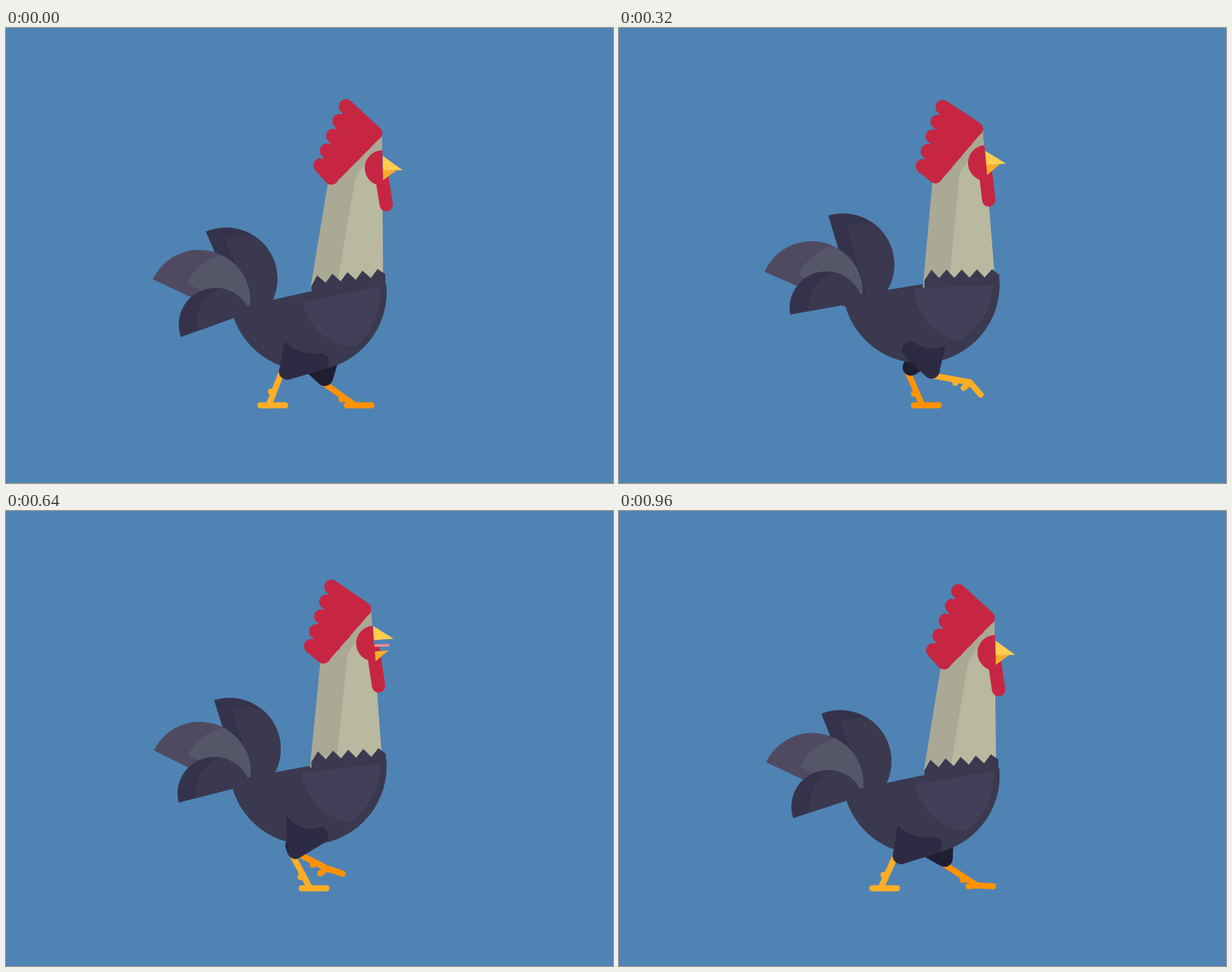
Animation, 800 px wide and 600 px high, one loop 1 s. Source, as an HTML page with a canvas:

```html
<!DOCTYPE html>
<html lang="en">
<head>
<meta charset="utf-8">
<title>Walking rooster</title>
<style>
html, body { margin: 0; height: 100%; overflow: hidden; background: #4f83b4; }
canvas { display: block; }
</style>
</head>
<body>
<canvas id="stage" width="800" height="600"></canvas>
<script>
const g = document.getElementById('stage').getContext('2d');
const LOOP = 1000, STEP = 40, PI = Math.PI, DEG = PI / 180;
const GROUND = 497.5, THIGH = 45, SHIN = 53;
const BODY = '#3b3950', TAIL = '#35334b', RED = '#c62641';

// Mean plus cosine and sine amplitudes of the first, second, ... harmonic
const wave = (w, mean, ...amps) => amps.reduce((sum, a, i) =>
  sum + a * Math[i % 2 ? 'sin' : 'cos']((1 + (i >> 1)) * w), mean);
const polar = (x, y, r, deg) => [x + r * Math.cos(deg * DEG), y + r * Math.sin(deg * DEG)];
const mix = (a, b, u) => [a[0] + (b[0] - a[0]) * u, a[1] + (b[1] - a[1]) * u];

function trace(pts, close) {
  g.beginPath();
  pts.forEach(p => g.lineTo(p[0], p[1]));
  if (close) g.closePath();
}
function fill(color) {
  g.fillStyle = color;
  g.fill();
}
function poly(color, pts) {
  trace(pts, true);
  fill(color);
}
function line(color, width, pts, close) {
  trace(pts, close);
  g.strokeStyle = color;
  g.lineWidth = width;
  g.stroke();
}
function dot(color, x, y, r) {
  g.beginPath();
  g.arc(x, y, r, 0, 2 * PI);
  fill(color);
}
function place(x, y, deg, draw) {
  g.save();
  g.translate(x, y);
  g.rotate(deg * DEG);
  draw();
  g.restore();
}

// Half disc with a shifted half disc inside it
function feather(x, y, deg, r, dx, dy, outer, inner) {
  place(x, y, deg, () => {
    g.beginPath();
    g.arc(0, 0, r, PI, 2 * PI);
    fill(outer);
    g.clip();
    g.beginPath();
    g.arc(dx, dy, r, PI, 2 * PI);
    fill(inner);
  });
}

// Two joints below the hip; angles lean forward from straight down
function leg(hipX, hipY, thigh, shin, toeRate) {
  const knee = polar(hipX, hipY, THIGH, 90 - thigh);
  const [x, y] = polar(...knee, SHIN, 90 - shin);
  const rise = Math.max(0, GROUND - y), u = Math.min(1, rise / 16);
  const lift = rise * u * u * (3 - 2 * u);      // a low foot settles on the ground
  return { knee, ankle: [x, GROUND - lift], lift, toe: lift * toeRate };
}

function drawShin(color, { knee, ankle, lift, toe }) {
  const [kx, ky] = knee, [x, y] = ankle, d = Math.hypot(x - kx, y - ky);
  const px = (ky - y) / d, py = (x - kx) / d;
  const top = [kx + 6.5 * px, ky + 6.5 * py], spur = mix(top, ankle, .66);
  line(color, 8, [top, ankle]);
  dot(color, spur[0] + 4 * px, spur[1] + 4 * py, 4);
  line(color, 8, [polar(x, y, 11, 180 - 1.4 * lift), ankle, polar(x, y, 21.5, toe)]);
}

function farThigh(knee, cy) {
  const pts = [[395, cy + 90], [430, cy + 80], knee];
  poly('#201e33', pts);
  line('#201e33', 22, pts, true);
}

// The hip corner swaps sides as the thigh swings through
function nearThigh([ax, ay], hipX, hipY, angle) {
  const color = '#2d2b43', s = Math.tanh((angle + 3) / 12);
  const bx = hipX - 16 * s, by = hipY + 19 - 3 * s;
  const cx = hipX + 1 + 33 * s, cy = hipY + 3 + 8 * s;
  const side = Math.sign((ax - cx) * (by - cy) - (ay - cy) * (bx - cx));
  const ca = side * 11 / Math.hypot(ax - cx, ay - cy);
  const ab = side * 11 / Math.hypot(bx - ax, by - ay);
  const top = [bx - ab * (by - ay), by + ab * (bx - ax)];
  const ctrl = mix(mix([cx, cy], top, .5), [ax, ay], .3);
  g.beginPath();
  g.moveTo(cx, cy);
  g.quadraticCurveTo(...ctrl, ...top);
  g.lineTo(bx, by);
  g.lineTo(ax, ay);
  g.lineTo(ax + ca * (ay - cy), ay - ca * (ax - cx));
  fill(color);
  line(color, 22, [[ax, ay], [bx, by]]);
}

function belly(cy, tilt) {
  g.beginPath();
  g.moveTo(398, cy);
  g.arc(398, cy, 103.7, -.1, PI + (.4 * tilt - 8) * DEG);
  fill(BODY);
}

function breast(cy, tilt) {
  place(400, cy - .75 * (tilt + 11), tilt, () => {
    g.beginPath();
    g.moveTo(-11.5, 11);
    g.lineTo(93.4, 11);
    g.arc(0, 0, 94, .12, 1.086);
    g.arc(63, 11, 74.5, 1.83, PI);
    fill('#424058');
  });
}

function collar() {
  const pts = [[-49.5, 14]];
  for (let x = -40; x <= 40; x += 10) pts.push([x, x % 20 ? 11 : 0]);
  poly(BODY, [...pts, [49.5, 8], [47, 30], [-49, 40]]);
}

function comb(bend) {
  const s = Math.sin(bend * DEG), c = Math.cos(bend * DEG), bases = [], tips = [];
  for (let i = 0; i < 5; i++) {
    const x = 38 - 14.5 * i, y = 14.5 * i - 195, vx = 6 * i - 38, vy = 5 * i - 36;
    bases.push([x, y]);
    tips.push([x + vx * c - vy * s, y + vx * s + vy * c]);
  }
  poly(RED, [bases[0], bases[4], ...tips.slice().reverse()]);
  line(RED, 18, [bases[0], bases[4]]);
  tips.forEach((p, i) => line(RED, 19, [p, bases[i]]));
}

function head(open, lean, turn) {
  poly('#aaa996', [[-48.5, 8], [-25, -128], [-10, -150], [38, -196], [47, -192], [47, 5]]);
  g.beginPath();
  g.moveTo(-14, 8);
  g.lineTo(11, -133);
  g.quadraticCurveTo(15, -152, 47, -166);
  g.lineTo(47, 5);
  fill('#b9b99f');
  comb(1.2 * turn);
  g.beginPath();
  g.arc(47.5, -149, 23.5, PI / 2, PI * 1.5);
  fill(RED);
  const half = open / 2, tongue = (open - 6) * 2.2;
  place(46, -140, -turn - lean, () => line(RED, 17.5, [[0, 0], [0, 40 + half]]));
  if (tongue > 0) poly('#f28c94', [[48, -148], [48 + tongue, -147], [48 + tongue, -143.5], [48, -144.5]]);
  poly('#fcab2a', [[48, half - 146], [66, half - 146], [48, half - 133]]);
  poly('#ffcd4f', [[48, -165 - half], [74, -146 - half], [48, -146 - half]]);
}

function draw(t) {
  const w = 2 * PI * t / LOOP, sway = Math.sin(w);
  const cy = wave(w, 340.6, 1.4, -2.6, 3.75, -3.6, .6, 0, 1.7);
  const tilt = wave(w, -6.4, 0, -.7, -5.1, -1.5);
  const neckY = wave(w, 318.7, 1.8, -3.2, 1.1, -5, .4, .8);
  const turn = wave(w, -3.2, 0, 0, 2.8, -.45);
  const lean = wave(w, 7.7, -3.2, .8, 4.6, .25);
  const open = t > 400 && t < 930 ? 15 * Math.sin(PI * (t - 400) / 530) : 0;
  const slope = .6 * (tilt + 1.5), hipY = cy + 70;

  const swing = wave(w, -19.4, -31.3, 16, 8.25, -13, 3.3, -.5);
  const near = leg(399, hipY, swing, wave(w, 19.1, -34.5, 32, -12.75, 0, 1, -3.5), 1.6);
  const far = leg(407, hipY, wave(w, -6.1, 40.9, -18.1, -10.5, -14.75, -7.4, 2.2),
    wave(w, 35.4, 21.6, -28.2, -16, 2.75, 7.9), .7);

  g.fillStyle = '#4f83b4';
  g.fillRect(0, 0, 800, 600);
  g.lineCap = g.lineJoin = 'round';

  drawShin('#ff9200', far);
  farThigh(far.knee, cy);
  const a1 = 77 + .9 * tilt - 1.5 * sway, a3 = 1.05 * tilt - 7.7;
  feather(290 + .78 * (a1 - 66.5), cy - 29 - tilt, a1, 67.5, 19, -19, TAIL, BODY);
  feather(254.6 - sway, cy + 8 - .35 * tilt + 1.5 * sway, 25 - 1.6 * sway,
    67.5, 43, -14, '#504a61', '#565669');
  feather(270 - .3 * a3, cy + 27.5 - 1.35 * tilt, a3, 48.3, 24, 4, TAIL, BODY);
  belly(cy, tilt);
  place(450 + .4 * turn, neckY + 12, turn, () => head(open, lean, turn));
  place(452 + .35 * slope, neckY, slope, collar);
  breast(cy, tilt);
  drawShin('#ffad26', near);
  nearThigh(near.knee, 399, hipY, swing);
}

function tick(now) {
  draw(Math.floor(now % LOOP / STEP) * STEP);
  requestAnimationFrame(tick);
}
draw(0);
requestAnimationFrame(tick);
</script>
</body>
</html>
```
